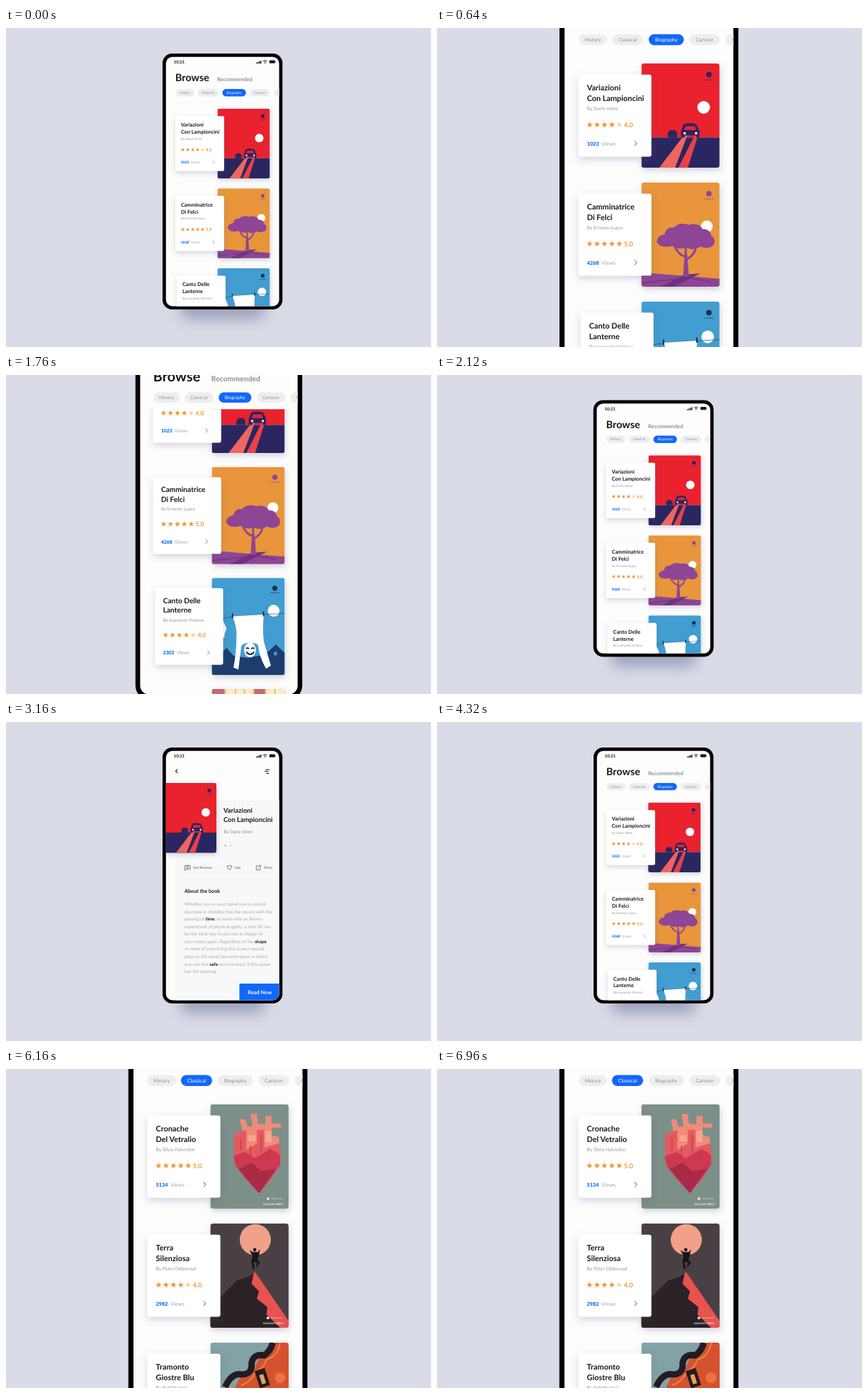
Recreate the animation shown at these times as an HTML page. Size 600 by 450 pixels, loop 7 s.

```html
<!DOCTYPE html>
<html lang="en">
<head>
<meta charset="utf-8">
<title>Book browser</title>
<style>
html, body { margin: 0; width: 100%; height: 100%; overflow: hidden; background: #d9dce7; }
svg { display: block; width: 600px; height: 450px; }
text { font-family: Lato, "Open Sans", sans-serif; text-rendering: geometricPrecision; }
</style>
</head>
<body>
<svg id="stage" viewBox="0 0 600 450"></svg>
<script>
const LOOP = 7000, PITCH = 112.6, TOP = 113.7, COVER_X = 298.5;
const INK = '#17181c', GREY = '#a3a5ac', BLUE = '#1268fb', GOLD = '#ec9a3e';

// Drawing helpers
const text = (x, y, size, fill, str, weight = 400, anchor = 'start') =>
  `<text x="${x}" y="${y}" font-size="${size}" fill="${fill}" font-weight="${weight}" text-anchor="${anchor}">${str}</text>`;
const rect = (x, y, w, h, fill, rx = 0, extra = '') =>
  `<rect x="${x}" y="${y}" width="${w}" height="${h}" rx="${rx}" fill="${fill}" ${extra}/>`;
const circle = (x, y, r, fill) => `<circle cx="${x}" cy="${y}" r="${r}" fill="${fill}"/>`;
const shape = (d, fill) => `<path d="${d}" fill="${fill}"/>`;
const line = (d, stroke, width = 1, extra = '') =>
  `<path d="${d}" fill="none" stroke="${stroke}" stroke-width="${width}" ${extra}/>`;
const group = (body, attrs = '') => `<g ${attrs}>${body}</g>`;

function star(x, y, r, fill, id = '') {
  let pts = '';
  for (let i = 0; i < 10; i++) {
    const a = i * Math.PI / 5, k = i % 2 ? r * .42 : r;
    pts += `${(k * Math.sin(a)).toFixed(2)},${(-k * Math.cos(a)).toFixed(2)} `;
  }
  return `<g transform="translate(${x} ${y})"><polygon ${id} points="${pts}" fill="${fill}"/></g>`;
}

const badge = color => circle(64, 10.5, 2.6, color) + text(64, 16, 2, color, 'la quercia', 700, 'middle');
const imprint = circle(54.5, 89.2, 1.3, '#e6e2df') + text(57, 90, 2.3, '#e6e2df', 'collana uno') +
  text(69, 95.2, 2.3, '#fff', 'RACCONTI BREVI', 700, 'end');

// Cover artwork, each 74 x 98.5
const art = {
  road: () => rect(0, 0, 74, 70, '#e9212f') + rect(0, 70, 74, 29, '#2a2560') + circle(59, 41.5, 6, '#fff') +
    shape('M41 67L17 98.5H32L44 67Z', '#f0655f') + shape('M51 67L35 98.5H44L54 67Z', '#ea3f48') +
    shape('M25 70V66L27 63H32L34 66V70Z', '#2a2560') +
    shape('M37.5 70V64L40 57.5Q46 55.5 52 57.5L55 64V70H52V68H41V70Z', '#2a2560') +
    shape('M40.5 63L42 59.3H50.5L52 63Z', '#e9212f') +
    circle(41, 66, 1.2, '#fff') + circle(51.8, 66, 1.2, '#fff') + badge('#2a2560'),
  tree: () => rect(0, 0, 74, 98.5, '#e8953b') + circle(62, 41.5, 5.6, '#fff') +
    shape('M0 85L74 91V98.5H0Z', '#8e4595') + shape('M41 87L56 86L31 98.5H18Z', '#6f3280') +
    line('M0 95L45 90L66 94', '#6f3280', .9) +
    shape('M14.5 56Q15 50 22 49Q23 42 31 42.5Q36 37 45 40Q54 37.5 58 44Q65 44 66 50Q71 53 68.5 59Q63 64 56 60.5Q49 65 43 61.5Q35 64 29 60Q18 63 14.5 56Z', '#8e4595') +
    line('M42 88V70Q35 69 31 59M42 73Q51 69 52 59M42 71L42 60', '#8e4595', 2) +
    shape('M40.8 68H43.4L45 89H39.5Z', '#8e4595') + badge('#8e4595'),
  ghost: () => rect(0, 0, 74, 98.5, '#429dd0') + circle(62.8, 33.4, 6, '#fff') +
    shape('M0 79L8 78L15 71L22 79L35 81L54 78L65 67.5L74 76V98.5H0Z', '#1b3d6e') +
    rect(63, 75, 3.2, 3.5, '#429dd0') + line('M0 42Q30 38 74 36', '#234a78', .5) +
    shape('M11 43L15 51L12 60L9 57Z M0 42H11L13 60L0 64Z', '#fff') +
    shape('M21 39L53 37Q51 52 53 65L60 89L55 92Q48 80 47 68Q43 65 39 66Q34 65 30 69L27 93L22 91Q25 76 25 61Q26 50 21 39Z', '#fff') +
    `<ellipse cx="38.8" cy="73" rx="6" ry="7.5" fill="#fff"/>` +
    line('M35 72Q36 70 37.7 72M40 72Q42 70 43 72M35 75Q39 80 43 75', '#18304f', 1.5) +
    line('M21 36V41M52.5 34V39', '#142a45', 1.3) + badge('#1b3050'),
  windows: () => rect(0, 0, 74, 98.5, '#c7686b') + rect(13, 0, 30, 27, '#efd096') + rect(54, 0, 20, 18, '#efd096') +
    rect(15, 0, 26, 24, '#faebc0') + rect(56, 0, 18, 15, '#faebc0') +
    line('M24 0V26M33 0V26M14 10H42M64 0V17M55 7H74', '#d3a56f', .9) +
    shape('M0 38L28 33L50 60H10Z', '#e0958a') + circle(54, 23, 2.8, '#7e3945') +
    shape('M47 44L50 27L58 26L63 44Z', '#edc267') + rect(54, 27, 10, 11, '#fff2d6', 0, 'transform="rotate(8 59 32)"'),
  heart: () => rect(0, 0, 74, 98.5, '#7b8f89') +
    shape('M31 29L28 14H33L35 21H40L38 9H44L45 18L52 19V11H58V18H67V22H58V29L65 31V45L24 50V27Z', '#ef8b79') +
    shape('M22 29L34 24V43L44 37V24H51V41L65 37L67 53L59 69L46 84L33 70L23 56Z', '#e45a60') +
    shape('M22 49L33 45L42 51L57 42L66 48V57L57 70L46 84L33 70L24 58Z', '#cf3851') +
    shape('M27 61L39 55L48 63L62 61L46 84Z', '#a92c47') +
    shape('M36 29H43V35H36ZM52 25H58V36H52Z', '#f6a58e') +
    line('M29 32V44M38 39V49M48 29V46M55 45V56', '#b93850', .8) + imprint,
  peak: () => rect(0, 0, 74, 98.5, '#4a4145') + circle(42.5, 15.3, 14.7, '#f1a189') +
    shape('M0 80L24 55L33 52L42.5 46L74 92V98.5H0Z', '#e8524f') +
    shape('M0 79L25 54L34 51L41 47L39 57L46 64L44 71L54 79L53 86L66 98.5H0Z', '#292427') +
    circle(42, 24.8, 1.6, '#171417') +
    shape('M37 25L40 27H45L47 24L46 30L44.5 34L47 37L43 42L44 37L41 36L42 43L40 43L38.8 35L40 31Z', '#171417') + imprint,
  town: () => rect(0, 0, 74, 98.5, '#82a2a5') + shape('M22 45L28 33L42 24L48 10L62 0H74V98.5H10Z', '#d4532f') +
    line('M14 42Q20 28 30 30Q40 30 39 19Q41 10 51 12Q57 8 59 0', '#241d22', 6) +
    line('M29 40Q38 38 43 27Q51 24 53 16Q64 13 66 0', '#e9854c', 1.3) +
    rect(44, 25, 10, 17, '#241d22', 0, 'transform="rotate(-18 49 33)"') + rect(47, 30, 4, 9, '#e8a15b', 0, 'transform="rotate(-18 49 33)"') +
    circle(66, 33, 5, '#ec7343')
};

const shelves = {
  bio: [
    ['road', 'Variazioni', 'Con Lampioncini', 'Dario Velmi', 4, 1023],
    ['tree', 'Camminatrice', 'Di Felci', 'Ernesto Lupra', 5, 4268],
    ['ghost', 'Canto Delle', 'Lanterne', 'Leonardo Vintessi', 4, 2302, 2],
    ['windows', 'The Potter', 'And Rosalinda', 'Nikolay Dremovin', 5, 3120]
  ],
  classic: [
    ['heart', 'Cronache', 'Del Vetralio', 'Silvia Halvorkin', 5, 5134],
    ['peak', 'Terra', 'Silenziosa', 'Peter Oldenvaal', 4, 2982],
    ['town', 'Tramonto', 'Giostre Blu', 'Rolf Nystral', 5, 1876]
  ]
};

function card([, first, second, author, rating, views, dx = 0]) {
  let out = rect(239, 10.5, 69, 77.6, '#fff', 2, 'filter="url(#cardShadow)"');
  out += text(247, 25.4, 7.3, INK, first, 700) + text(247, 35.3, 7.3, INK, second, 700);
  out += text(247, 44.2, 4.55, '#94969d', 'By ' + author);
  for (let i = 0; i < 5; i++) out += star(249.6 + 7 * i, 58, 3, i < rating ? GOLD : '#f4d6a9');
  out += text(282, 60.2, 6.1, GOLD, rating + '.0', 700);
  out += text(247, 77.6, 4.9, '#0f75ea', views, 900) + text(260.8, 77.6, 5, GREY, 'Views');
  out += line('M292 73.4L294.2 75.7L292 78', '#85878e', .7);
  return group(out, `transform="translate(${dx} 0)"`);
}

const shelf = name => group(shelves[name].map((book, i) => {
  const cover = group(group(art[book[0]](), 'clip-path="url(#coverClip)"'), 'filter="url(#coverShadow)"');
  return group(
    group(group(cover, `transform="translate(${COVER_X} 0)"`), `id="${name}Cover${i}"`) +
    group(card(book), `id="${name}Card${i}"`),
    `transform="translate(0 ${TOP + PITCH * i})"`);
}).join(''), `id="${name}"`);

const tabs = [['History', 239.2, 26.8], ['Classical', 270.7, 29.5], ['Biography', 305.5, 33.2], ['Cartoon', 344, 28.9], ['Novels', 377.9, 27]];
const pills = tabs.map(([label, x, w], i) =>
  rect(x, 86, w, 10.4, '#eceef0', 5.2, `id="pill${i}"`) +
  group(text(x + w / 2, 92.9, 4.75, 'currentColor', label, 400, 'middle'), `id="label${i}"`)).join('');

const header = text(239, 75, 14.3, INK, 'Browse', 700) + text(298, 75, 7.5, '#8d8f96', 'Recommended', 700) + pills;

const statusBar = text(236.7, 50.2, 6, INK, '10:21', 700) +
  [0, 1, 2, 3].map(i => rect(353 + 2 * i, 48.6 - i * .9, 1.4, 1.6 + i * .9, INK, .3)).join('') +
  line('M362.8 46.8Q365.7 44.2 368.6 46.8M364 48.2Q365.7 46.7 367.4 48.2', INK, .9) + circle(365.7, 49.4, .7, INK) +
  rect(371.8, 45.6, 8, 4.2, INK, 1) + rect(380.2, 46.9, .7, 1.6, INK);

const bold = word => `<tspan fill="${INK}" font-weight="700">${word}</tspan>`;
const about = [
  'Whether you or your loved one is natural', 'decrease in mobility that the occurs with the',
  `passing of ${bold('time')}, or deals with an illness-`, 'related lack of physical agility, a stair lift can',
  'be the ideal way to put you in charge of', `your home again. Regardless of the ${bold('shape')}`,
  'or make of your living this is your special', 'place in the world personal space in which',
  `you can feel ${bold('safe')} and nurtured. If this space`, 'has the amazing.'
];
const outline = d => line(d, '#55575e', .8, 'stroke-linejoin="round"');
const detail =
  group(rect(239, 110, 150, 290, '#f7f8fa'), 'id="panel"') +
  group(line('M242.3 66.6L239.5 69.4L242.3 72.2', INK, 1.1) +
    line('M366.2 67.2H372M365 69.8H370.5M367.4 72.5H371.3', INK, 1), 'id="nav"') +
  group(text(307, 128, 9.4, INK, 'Variazioni', 700) + text(307, 140.5, 9.4, INK, 'Con Lampioncini', 700) +
    text(307.5, 157, 6.3, '#8b8d94', 'By Dario Velmi'), 'id="heading"') +
  [0, 1, 2, 3, 4].map(i => star(309.6 + 7.1 * i, 174.5, 3.2, i < 4 ? GOLD : '#f4d6a9', `id="star${i}"`)).join('') +
  group(text(343, 176.8, 6.4, GOLD, '4.0', 700), 'id="score"') +
  group(
    outline('M252.7 202.3H260V207.6H255L252.7 209.3ZM254.5 204H258M254.5 205.8H258') + text(264.3, 207.2, 4.9, '#55575e', 'See Reviews') +
    outline('M315.5 208.8L312.3 205.3Q311.5 202.5 314 202.3L315.5 203.5L317 202.3Q319.5 202.5 318.7 205.3Z') + text(322.8, 207.2, 4.9, '#55575e', 'Like') +
    outline('M356 202.8H353.3V208.7H359.2V206M355.5 206.5L359.4 202.4M357 202.3H359.5V204.8') + text(363.8, 207.2, 4.9, '#55575e', 'Share') +
    line('M252 221.8H377', '#e9ebee', .7), 'id="actions"') +
  group(text(252, 241.4, 7.2, INK, 'About the book', 700) +
    about.map((row, i) => text(252, 259.1 + 10.56 * i, 6.4, '#a9abb2', row)).join(''), 'id="about"') +
  group(rect(329.5, 369, 60, 30, BLUE) + text(341.3, 384.3, 7.4, '#fff', 'Read Now', 700), 'id="button"');

const stage = document.getElementById('stage');
stage.innerHTML = `
<defs>
  <filter id="cardShadow" x="-30%" y="-30%" width="160%" height="160%"><feDropShadow dx="0" dy="3" stdDeviation="3.5" flood-color="#4a506a" flood-opacity=".23"/></filter>
  <filter id="coverShadow" x="-30%" y="-30%" width="160%" height="160%"><feDropShadow dx="1" dy="2.5" stdDeviation="3" flood-color="#4a506a" flood-opacity=".25"/></filter>
  <filter id="soft" x="-50%" y="-100%" width="200%" height="300%"><feGaussianBlur stdDeviation="10"/></filter>
  <clipPath id="coverClip"><rect width="74" height="98.5" rx="2.4"/></clipPath>
  <clipPath id="screenClip"><rect x="225.8" y="40.8" width="159.8" height="351.6" rx="9"/></clipPath>
  <clipPath id="listClip"><rect id="listWindow" x="220" y="103" width="170" height="400"/></clipPath>
</defs>
${rect(0, 0, 600, 450, '#d9dce7')}
<g id="phone">
  ${rect(246, 375, 120, 36, '#9ba2ba', 12, 'filter="url(#soft)"')}
  ${rect(221, 36, 169.3, 361, '#000', 13.5)}
  <g clip-path="url(#screenClip)">
    ${rect(225, 40, 162, 354, '#fdfdfe')}
    ${group(detail, 'id="detail"')}
    ${group(header, 'id="header"')}
    ${group(group(shelf('bio') + shelf('classic'), 'id="list"'), 'clip-path="url(#listClip)"')}
    ${statusBar}
  </g>
</g>`;

const el = {};
stage.querySelectorAll('[id]').forEach(node => el[node.id] = node);

// Motion helpers
const clamp = v => Math.max(0, Math.min(1, v));
const inOut = v => v < .5 ? 4 * v ** 3 : 1 - 4 * (1 - v) ** 3;
const span = (t, from, to) => clamp((t - from) / (to - from));
const ease = (t, from, to) => inOut(span(t, from, to));
const there = (t, a, b, c, d) => ease(t, a, b) - ease(t, c, d);
const move = (node, x, y) => node.setAttribute('transform', `translate(${x} ${y})`);
const fade = (node, o) => {
  node.setAttribute('opacity', o);
  node.style.display = o > .001 ? '' : 'none';
};
const mix = (a, b, k) => `rgb(${a.map((v, i) => Math.round(v + (b[i] - v) * k))})`;

function render(t) {
  const zoom = there(t, 90, 700, 1500, 2200) + ease(t, 5340, 5940);
  el.phone.setAttribute('transform', `translate(${-157.2 * zoom} ${-119.9 * zoom}) scale(${1 + .493 * zoom})`);
  move(el.list, 0, -113.1 * there(t, 700, 1110, 1500, 2050));

  // Opening and closing the book page
  const open = there(t, 2600, 3110, 3820, 4380);
  const leave = clamp(open * 1.8);
  fade(el.header, 1 - leave);
  move(el.header, 0, -8 * open);
  move(el.bioCover0, -75.5 * open, -27.7 * open);
  fade(el.bioCard0, 1 - leave);
  move(el.bioCard0, -30 * open, 0);
  for (let i = 1; i < 4; i++) {
    for (const part of ['Cover', 'Card']) {
      const node = el['bio' + part + i];
      fade(node, 1 - leave);
      move(node, 0, 45 * open);
    }
  }
  el.listWindow.setAttribute('y', 103 - 65 * clamp(open * 3));
  fade(el.detail, open);
  move(el.panel, 60 * (1 - open), 0);
  ['heading', 'actions', 'about'].forEach((id, i) => move(el[id], (14 + 8 * i) * (1 - open), 0));
  move(el.button, 0, 28 * (1 - open));
  for (let i = 0; i < 5; i++) {
    const start = 3040 + i * 45;
    el['star' + i].setAttribute('transform', `scale(${span(t, start, start + 210)})`);
  }
  fade(el.score, span(t, 3300, 3500));

  // Switching the category
  const swap = ease(t, 5860, 6120);
  fade(el.bio, 1 - clamp(swap * 1.6));
  move(el.bio, 22 * swap, 0);
  fade(el.classic, clamp(swap * 1.6 - .6));
  move(el.classic, -18 * (1 - swap), 0);
  tabs.forEach((_, i) => {
    const on = i === 1 ? swap : i === 2 ? 1 - swap : 0;
    el['pill' + i].setAttribute('fill', mix([236, 238, 240], [18, 104, 251], on));
    el['label' + i].setAttribute('color', mix([140, 143, 150], [255, 255, 255], on));
  });
}

const begin = performance.now();
function tick() {
  render((performance.now() - begin) % LOOP);
  requestAnimationFrame(tick);
}
tick();
</script>
</body>
</html>
```
